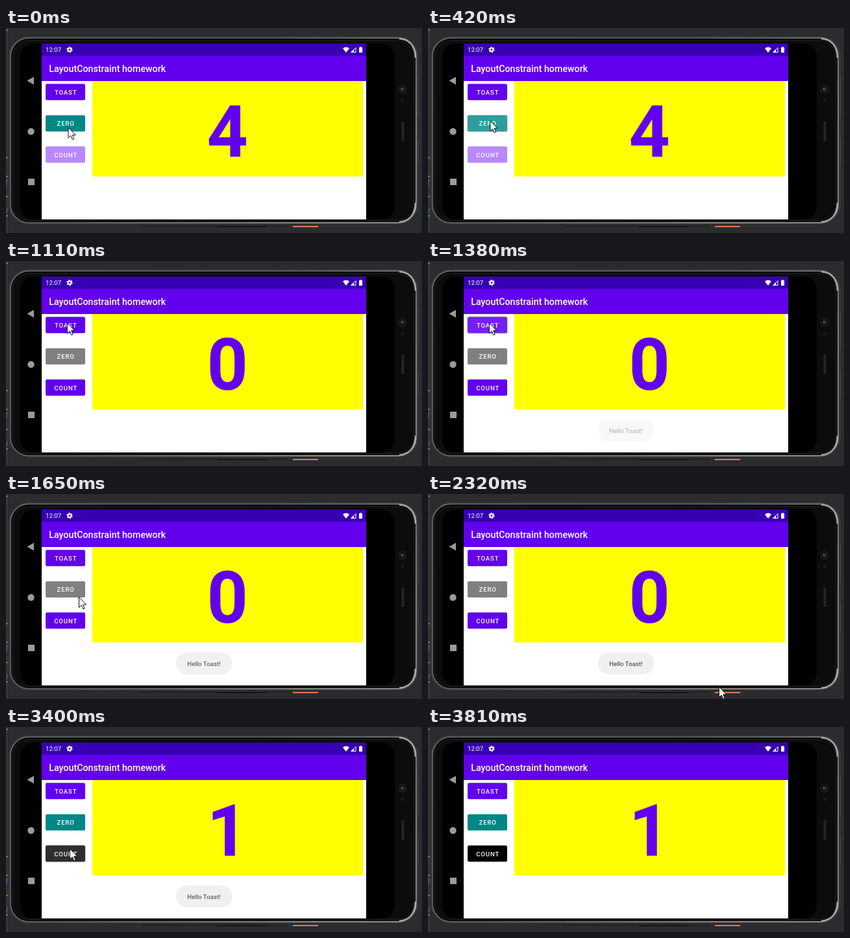
An HTML page that plays this animation: 641x317 px, repeating every 4.34 s.

```html
<!DOCTYPE html>
<html lang="en">
<head>
<meta charset="utf-8">
<title>Counter app demo</title>
<style>
  html, body { margin: 0; width: 100%; height: 100%; overflow: hidden; background: #2b2c2e; }
  svg { display: block; width: 641px; height: 317px; font-family: Roboto, sans-serif; }
  text { fill: #fff; }
  .button { filter: drop-shadow(0 .6px .5px #0005); }
  .button.pressed { filter: drop-shadow(0 .8px .9px #0006); }
  .button text { font: 500 9.6px Roboto, sans-serif; letter-spacing: .86px; }
</style>
</head>
<body>
<svg viewBox="0 0 641 317">
  <defs>
    <linearGradient id="rim" x2="1" y2=".5">
      <stop stop-color="#707070"/><stop offset=".5" stop-color="#686868"/>
      <stop offset="1" stop-color="#a8a8a8"/>
    </linearGradient>
  </defs>

  <!-- Editor behind the phone -->
  <rect width="641" height="317" fill="#2b2c2e"/>
  <path d="M1.5 0V317" stroke="#444548"/>
  <path d="M0 3.5H3M0 200.5H3M0 229.5H3M0 260.5H3M0 290.5H3" stroke="#b8862f" stroke-width="1.5"/>
  <path d="M0 235H3M1 235V243" stroke="#7a5c96"/>
  <path d="M0 286L3 279" stroke="#5a78b0"/>
  <path d="M208 306.5H324M403 306.5H434" stroke="#191919"/>
  <path d="M325 307H402" stroke="#141414" stroke-width="2"/>
  <path d="M442 307H481" stroke="#e07a5c" stroke-width="2"/>

  <!-- Phone body -->
  <path d="M635.5 76V137M635.5 170V212" stroke="#3c3c3c"/>
  <rect x="5" y="14" width="629.5" height="288.5" rx="30" fill="#1c1c1c" stroke="#4c4c4c"/>
  <rect x="7" y="15.5" width="625" height="285.5" rx="28" fill="#080808" stroke="url(#rim)" stroke-width="1.6"/>
  <g fill="none" stroke="#a6a6a6" stroke-width="2.4">
    <path d="M606 16.5Q630 18 631 46"/>
    <path d="M606 300Q630 298 631 270"/>
  </g>
  <rect x="10.5" y="19.5" width="618" height="278" rx="25" fill="#0c0c0c" stroke="#242424"/>
  <rect x="22" y="24" width="577" height="272" rx="20"/>
  <circle cx="611" cy="95" r="6" fill="#111" stroke="#1e1e1e" stroke-width="1.5"/>
  <circle cx="611" cy="95" r="3" fill="#2c2d31"/>
  <circle cx="610" cy="94" r="1" fill="#777"/>
  <circle cx="611" cy="112" r="2.5" fill="#191919"/>
  <path d="M611.5 145V175" stroke="#343434" stroke-width="4" stroke-dasharray="1.5 1"/>
  <g fill="#9b9b9b">
    <path d="M32.5 81.5L43 75.5V87.5Z"/>
    <circle cx="38.5" cy="160" r="5.2"/>
    <rect x="34" y="233" width="10" height="10"/>
  </g>

  <!-- App screen -->
  <rect x="55" y="24" width="500" height="272" fill="#fff"/>
  <rect x="55" y="24" width="500" height="19" fill="#3700b3"/>
  <rect x="55" y="43" width="500" height="39" fill="#6200ee"/>
  <text x="61" y="37.2" font-size="9.7">12:07</text>
  <g fill="none" stroke="#fff">
    <circle cx="98" cy="33.5" r="2.5" stroke-width="2"/>
    <circle cx="98" cy="33.5" r="4" stroke-width="1.4" stroke-dasharray="2.1 2.089"/>
    <path d="M532 37.5L539 30.5V37.5Z"/>
  </g>
  <g fill="#fff">
    <path d="M519 31.5Q524 27.5 529 31.5L524 38Z"/>
    <path d="M531 38L536 33V38Z"/>
    <path d="M544 30H545.5V29H547.5V30H549V38H544Z"/>
  </g>
  <text x="66.2" y="68" font-size="14.25" font-weight="500">LayoutConstraint homework</text>
  <rect x="133" y="82" width="417" height="147.5" fill="#ff0"/>
  <text id="count" x="341.2" y="199.4" font-size="110.5" font-weight="700" text-anchor="middle" style="fill:#6200ee"></text>
  <g id="buttons"></g>
  <g id="toast">
    <rect x="262" y="245" width="86.5" height="34" rx="17" fill="#f0f0f0"/>
    <text x="305" y="266.3" font-size="9.7" text-anchor="middle" style="fill:#333">Hello Toast!</text>
  </g>
  <path id="cursor" d="M.5 .5V16.5L4.2 13L6.8 19L9.2 18L6.7 12H11.7Z" fill="#fff" stroke="#111"/>
</svg>
<script>
const LOOP = 4340;
const PURPLE = '#6200ee', TEAL = '#018786', GRAY = '#808080', PALE = '#b988ff';
const $ = id => document.getElementById(id);

const button = (label, y) => `<g class="button">
  <rect x="61" y="${y}" width="61" height="25" rx="2.5"/>
  <rect x="61" y="${y}" width="61" height="25" rx="2.5" fill="#fff"/>
  <text x="92.2" y="${y + 16.4}" text-anchor="middle">${label}</text></g>`;
$('buttons').innerHTML = button('TOAST', 86.4) + button('ZERO', 135) + button('COUNT', 183.2);
const [toastButton, zeroButton, countButton] = $('buttons').children;

// Each step changes part of the state and holds until the next one.
const steps = [
  [0, { n: 4, zero: TEAL, count: PALE, toast: 0, press: [0, 0, 0], at: [95.5, 153.5] }],
  [150, { at: [95.5, 148] }],
  [270, { at: [95.5, 143] }],
  [420, { press: [0, .18, 0] }],
  [570, { n: 0, zero: GRAY, count: PURPLE, press: [0, .14, 0] }],
  [720, { press: [0, 0, 0], at: [95, 133] }],
  [840, { at: [95, 112] }],
  [960, { at: [94.5, 97] }],
  [1110, { at: [94, 95.5] }],
  [1230, { press: [.18, 0, 0] }],
  [1380, { press: [.12, 0, 0], toast: .4 }],
  [1530, { press: [0, 0, 0], toast: .75, at: [104, 128] }],
  [1650, { toast: .9, at: [112, 159] }],
  [1770, { toast: 1, at: [117, 188] }],
  [1890, { at: [119, 203] }],
  [2320, { at: [448, 298] }],
  [2440, { at: null }],
  [2690, { at: [310, 235] }],
  [2840, { at: [160, 205] }],
  [2960, { at: [98, 188] }],
  [3240, { press: [0, 0, .18] }],
  [3400, { n: 1, zero: TEAL, count: '#000', press: [0, 0, .18], toast: .94 }],
  [3530, { press: [0, 0, 0], toast: .4, at: [213, 232] }],
  [3680, { toast: 0, at: [523, 298] }],
  [3810, { at: null }]
];

function paint(el, color, ripple) {
  el.children[0].setAttribute('fill', color);
  el.children[1].setAttribute('opacity', ripple);
  el.classList.toggle('pressed', ripple > 0);
}

function draw(now) {
  const t = now % LOOP;
  const s = Object.assign({}, ...steps.filter(([start]) => start <= t).map(([, change]) => change));
  $('count').textContent = s.n;
  paint(toastButton, PURPLE, s.press[0]);
  paint(zeroButton, s.zero, s.press[1]);
  paint(countButton, s.count, s.press[2]);
  $('toast').setAttribute('opacity', s.toast);
  $('cursor').setAttribute('visibility', s.at ? 'visible' : 'hidden');
  if (s.at) $('cursor').setAttribute('transform', `translate(${s.at})`);
}

const start = performance.now();
function tick() {
  draw(performance.now() - start);
  requestAnimationFrame(tick);
}
tick();
</script>
</body>
</html>
```
